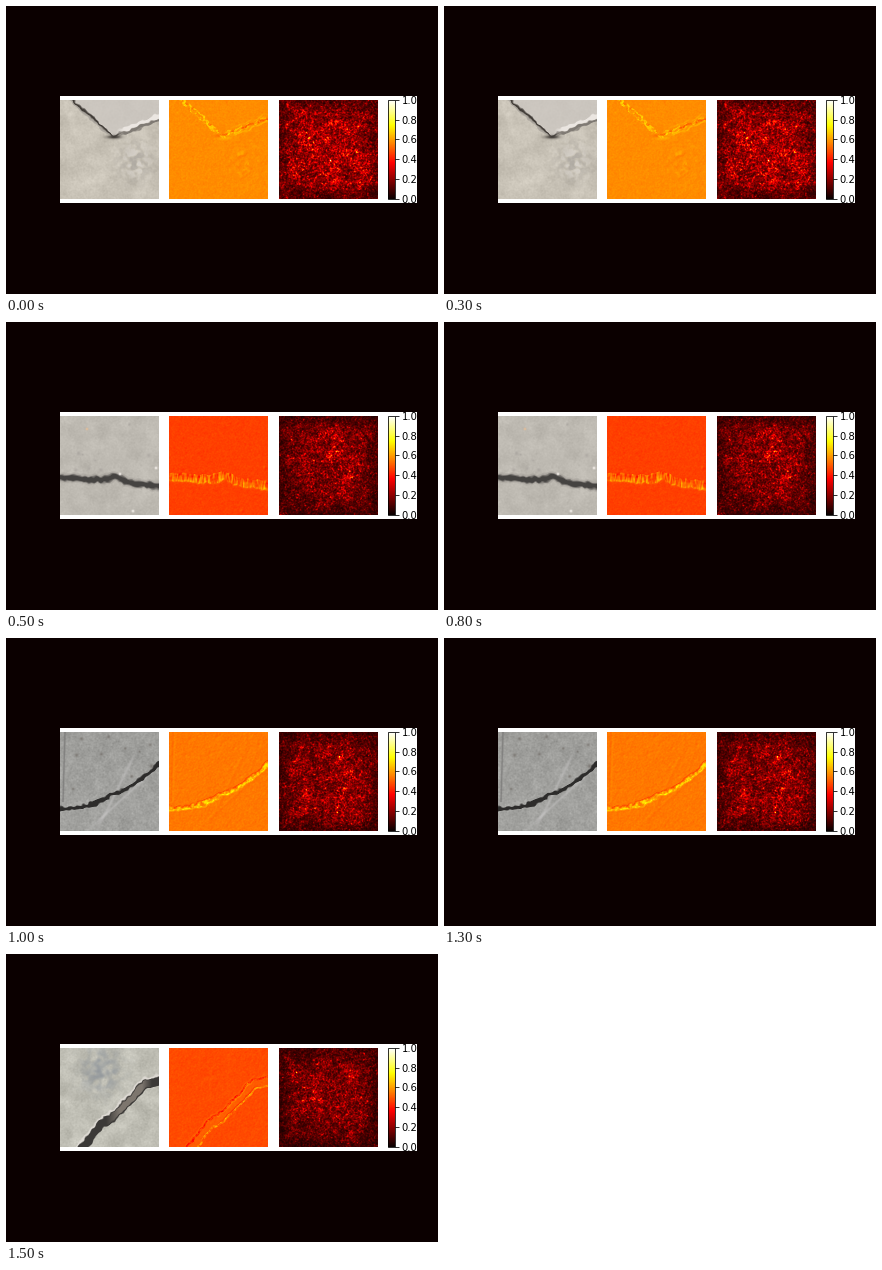
Recreate the animation shown at these times as a matplotlib script. Size 432 by 288 pixels, loop 2 s.

```python
import matplotlib.pyplot as plt
import numpy as np
from matplotlib.animation import FuncAnimation
from matplotlib.cm import ScalarMappable
from matplotlib.patches import Rectangle

W, H, DPI = 432, 288, 72
N = 99
Y, X = np.mgrid[0:N, 0:N] + 0.5


def noise(rng, sx, sy=None):
    """Smooth random field with zero mean and unit spread."""
    sy = sx if sy is None else sy
    fy, fx = np.fft.fftfreq(N)[:, None], np.fft.fftfreq(N)[None, :]
    low = np.exp(-2 * np.pi**2 * ((sx * fx)**2 + (sy * fy)**2))
    field = np.fft.ifft2(np.fft.fft2(rng.standard_normal((N, N))) * low).real
    return (field - field.mean()) / field.std()


def bump(x, center, width):
    return np.exp(-((x - center) / width)**2)


def spot(x, y, rx, ry=None):
    return bump(X, x, rx) * bump(Y, y, ry or rx)


def band(d, lo, hi, soft=1.2):
    up = np.clip((d - lo) / soft + 0.5, 0, 1)
    return up * np.clip((hi - d) / soft + 0.5, 0, 1)


def below(curve, rng, rough):
    """Signed distance below a ragged curve y(x)."""
    x = np.arange(-6, N + 6) + 0.5
    slope = np.convolve(np.gradient(curve(x)), np.ones(13) / 13, "valid")
    ragged = curve(X) + rough * noise(rng, 1.5)
    return (Y - ragged) / np.hypot(1, slope)


def ground(color, rng, grain, cloud):
    tone = grain * noise(rng, 0.6) + cloud * noise(rng, 4)
    return np.array(color, float) + tone[..., None]


def tint(img, color, mask):
    a = np.clip(mask, 0, 1)[..., None]
    return img * (1 - a) + np.array(color) * a


def shade(img, gray, mask, warm=5):
    return tint(img, (gray + warm, gray, gray - warm), mask)


def pits(img, rng, count, gray):
    for x, y in rng.uniform(4, 58, (count, 2)) * (1.6, 1):
        img = shade(img, gray, 0.7 * spot(x, y, rng.uniform(1, 2)))
    return img


def corner_crack(rng):
    img = ground((200, 194, 182), rng, 2.5, 4)
    d = below(lambda x: 37 - np.where(x < 53, 0.92 * (53 - x), 0.42 * (x - 53)),
              rng, 0.7)
    right = np.clip((X - 56) / 8, 0, 1)
    img = shade(img, 200, 0.7 * band(d, -90, 0))
    patch, rough = spot(75, 61, 16, 18), noise(rng, 1.6)
    img = shade(img, 216, 0.7 * patch * np.clip(rough, 0, 1))
    img = shade(img, 160, 0.6 * patch * np.clip(-rough, 0, 1))
    img = shade(img, 230, band(d, -4, -0.5) * right)
    img = shade(img, 105, 0.8 * band(d, 0, 3) * right)
    img = shade(img, 62, band(d, -1.1, 0.9) * (1 - right))
    img = shade(img, 145, 0.6 * band(d, 0.9, 2.5) * (1 - right))
    img = shade(img, 62, spot(54, 37, 7, 1.8))
    flecks = np.clip(0.4 + 0.6 * noise(rng, 0.7), 0, 1)
    return img, band(d, -2.5, 2) * flecks + 0.5 * patch * np.clip(rough - 1, 0, 1)


def level_crack(rng):
    img = pits(ground((190, 186, 178), rng, 2, 3), rng, 8, 164)
    d = below(lambda x: 61 + 0.09 * x - 5 * bump(x, 56, 9), rng, 0.6)
    img = shade(img, 136, 0.6 * band(d, -4.5, 4, 3))
    img = shade(img, 67, band(d, -2.8, 2.8, 2), 2)
    for x, y in [(96, 52), (73, 95), (60, 58)]:
        img = shade(img, 238, spot(x, y, 1.4))
    img = shade(img, 190, spot(27, 13, 1.2), 40)
    stripes = np.clip(0.45 + 0.45 * noise(rng, 0.5, 2.2), 0, 1.3)
    return img, band(d, -5, 3.5) * stripes


def rising_crack(rng):
    img = pits(ground((160, 160, 157), rng, 4, 3), rng, 10, 112)
    d = below(lambda x: 77 - 0.0046 * x**2 - 2 * bump(x, 51, 8), rng, 0.7)
    img = shade(img, 118, 0.7 * bump(X + Y / 35, 5, 1) * (Y < 70), 1)
    scratch = bump(X + 0.5 * Y, 86, 1.8) + bump(X + 1.1 * Y, 136, 2)
    img = shade(img, 188, 0.6 * scratch * band(Y, 24, 96, 20), 1)
    img = shade(img, 44, band(d, -2, 1.9), 1)
    flecks = np.clip(0.7 + 0.4 * noise(rng, 0.7), 0, 1.4)
    return img, band(d, -2, 2) * flecks


def wide_crack(rng):
    img = ground((191, 190, 180), rng, 3, 5)
    smudge = spot(42, 22, 18, 20) * np.clip(0.5 + 0.4 * noise(rng, 2), 0, 1)
    img = shade(img, 149, smudge, -6)
    d = below(lambda x: np.maximum(99 - 1.02 * (x - 24), 37 - 0.25 * (x - 83))
              - 5 * bump(x, 40, 9), rng, 0.7)
    half = 4.2
    body = band(d, -half, half)
    upper = np.clip((X - 46) / 14, 0, 1) * np.clip((92 - X) / 10, 0, 1)
    img = shade(img, 222, 0.8 * band(d, -half - 2, -half))
    img = shade(img, 57, body, 2)
    img = shade(img, 125, 0.9 * band(d, 1 - half, half - 1.5) * upper, 8)
    rims = band(np.abs(d), half - 1, half + 1)
    return img, 0.4 * body + rims * (0.3 + 0.5 * noise(rng, 0.6))


def response(img, mask, base, gain, rng):
    """Embossed brightness around a flat level."""
    gy, gx = np.gradient(img.mean(axis=2) / 255)
    relief = np.clip(0.25 * (gx + gy), -0.07, 0.05)
    return base + gain * mask + relief + 0.005 * noise(rng, 0.5)


def speckle(rng, level):
    rim = np.minimum(np.minimum(X, N - X), np.minimum(Y, N - Y))
    fade = 0.55 + 0.45 * np.clip(rim / 18, 0, 1)
    glow = 0.85 + 0.25 * spot(60, 46, 38)
    grains = sum(a * noise(rng, s) for a, s in [(0.3, 0.5), (0.14, 1.5), (0.1, 5)])
    return level * fade * glow * np.exp(grains)


# painter, flat response, crack gain, speckle level
SCENES = [
    (corner_crack, 0.574, 0.09, 0.22),
    (level_crack, 0.460, 0.12, 0.17),
    (rising_crack, 0.544, 0.11, 0.18),
    (wide_crack, 0.477, 0.07, 0.16),
]


def build(index):
    painter, base, gain, level = SCENES[index]
    rng = np.random.default_rng(40 + index)
    img, mask = painter(rng)
    photo = np.clip(img, 0, 255).astype(np.uint8)
    return photo, response(img, mask, base, gain, rng), speckle(rng, level)


plt.rcParams["font.family"] = "DejaVu Sans"
fig = plt.figure(figsize=(W / DPI, H / DPI), dpi=DPI, facecolor=plt.cm.hot(0))


def pixel_axes(x, y, w, h):
    return fig.add_axes([x / W, 1 - (y + h) / H, w / W, h / H])


fig.add_artist(Rectangle((54 / W, 1 - 197 / H), 357 / W, 107 / H, color="white",
                         lw=0, transform=fig.transFigure, zorder=-1))

views = []
for left in (54, 163, 273):
    ax = pixel_axes(left, 94, N, N)
    ax.axis("off")
    views.append(ax.imshow(np.zeros((N, N)), cmap="hot", vmin=0, vmax=1,
                           interpolation="nearest", aspect="auto"))

bar = fig.colorbar(ScalarMappable(plt.Normalize(0, 1), "hot"),
                   cax=pixel_axes(381.9, 94.05, 6.9, 98.5))
bar.set_ticks(np.linspace(0, 1, 6))
bar.ax.tick_params(labelsize=10)

panels = [build(i) for i in range(len(SCENES))]


def update(i):
    for view, data in zip(views, panels[i % len(panels)]):
        view.set_data(data)
    return views


anim = FuncAnimation(fig, update, frames=len(panels), interval=500,
                     repeat=True, repeat_delay=0, blit=False)
plt.show()
```
